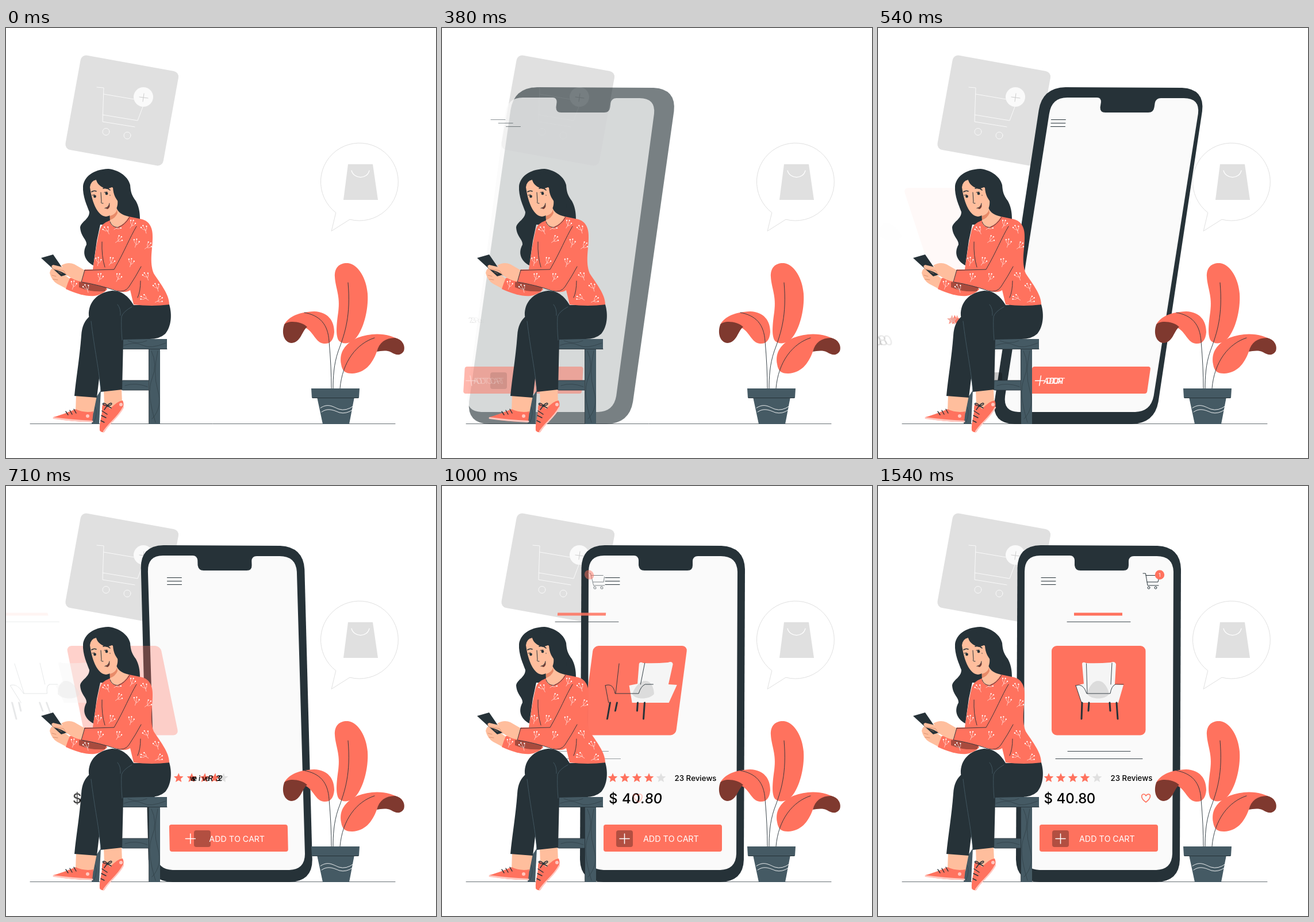
Animation, 748 px wide and 748 px high, one loop 1620 ms. Source, as an HTML page with a canvas:

```html
<!DOCTYPE html>
<html lang="en">
<head>
<meta charset="utf-8">
<title>Add to cart</title>
<style>
html, body { margin: 0; width: 100%; height: 100%; overflow: hidden; background: #fff; }
canvas { display: block; width: 100vw; height: 100vh; }
</style>
</head>
<body>
<canvas id="stage" width="748" height="748"></canvas>
<script>
const ctx = document.getElementById('stage').getContext('2d');
const DARK = '#263238', SLATE = '#455a64', CORAL = '#ff725e', MAROON = '#7f392f';
const SKIN = '#ffbe9d', GREY = '#e0e0e0', PALE = '#fafafa', WHITE = '#fff';
const LOOP = 1620, STEP = 1000 / 24, PHONE_Y = 396;

// ---------- drawing helpers ----------
const cache = {};
const path = d => cache[d] || (cache[d] = new Path2D(d));
function fill(d, color) { ctx.fillStyle = color; ctx.fill(path(d)); }
function line(d, color = DARK, width = 1) {
  ctx.strokeStyle = color;
  ctx.lineWidth = width;
  ctx.stroke(path(d));
}
function dot(x, y, r, color) {
  ctx.fillStyle = color;
  ctx.beginPath();
  ctx.arc(x, y, r, 0, 7);
  ctx.fill();
}
function ring(x, y, r, color, width = 1) {
  ctx.strokeStyle = color;
  ctx.lineWidth = width;
  ctx.beginPath();
  ctx.arc(x, y, r, 0, 7);
  ctx.stroke();
}
function box(x, y, w, h, r, color) {
  ctx.fillStyle = color;
  ctx.beginPath();
  ctx.roundRect(x, y, w, h, r);
  ctx.fill();
}
function star(x, y, color) {
  ctx.fillStyle = color;
  ctx.beginPath();
  for (let i = 0; i < 10; i++) {
    const r = i % 2 ? 3.9 : 8.8, a = i * Math.PI / 5;
    ctx.lineTo(x + r * Math.sin(a), y - r * Math.cos(a));
  }
  ctx.fill();
}

// ---------- motion ----------
function along(keys, u) {
  if (u <= keys[0][0]) return keys[0][1];
  for (let i = 1; i < keys.length; i++) {
    const [a, va] = keys[i - 1], [b, vb] = keys[i];
    if (u <= b) return va + (vb - va) * (u - a) / (b - a);
  }
  return keys[keys.length - 1][1];
}
// Each entrance slides in from the left, leans one way, swings back and settles.
const FAST = {
  x: [[0, -700], [6, -445], [9, -158], [11, 48], [12, 25], [13, 0]],
  lean: [[0, .364], [3, .35], [6, .24], [8.8, -.13], [11, -.21], [13, -.147], [14, -.08], [15.5, .02], [16.5, .036], [18, .02], [20, 0]],
  alpha: [[1, 0], [3, .03], [6, .17], [9, .62], [11, 1]]
};
const SLOW = {
  x: [[0, -370], [2, -352], [5, -270], [7, -190], [9, -140], [11, -60], [12, -25], [13, -2], [14, 5], [16, 0]],
  lean: [[0, .364], [4, .25], [7, .05], [9, -.08], [12, -.176], [14, -.1], [16, .035], [19, 0]],
  alpha: [[0, 0], [2, .07], [5, .35], [7, .65], [9, .85], [11, 1]]
};
const SQUARE = {
  x: [[4, -420], [9, -219], [13, -116], [17, 24], [20, 0]],
  lean: [[4, 0], [9, 0]],
  alpha: [[4, 0], [9, .35], [13, .75], [16, 1]]
};
let step = 0;
const rock = y => (y - PHONE_Y) * along(FAST.lean, step) / 2;

function enter(curve, pivot, draw, { delay = 0, rate = 1, reach = 1, shift = 0, fade = 1 } = {}) {
  const u = (step - delay) * rate;
  const alpha = along(curve.alpha, u) ** fade;
  if (!alpha) return;
  const lean = along(curve.lean, u);
  ctx.save();
  ctx.globalAlpha = alpha;
  ctx.transform(1, 0, lean, 1, along(curve.x, u) * reach + shift - lean * pivot, 0);
  draw();
  ctx.restore();
}
function letters(text, x, y, font, color, options, lag) {
  [...text].forEach((ch, i) => {
    ctx.font = font;
    const left = x + ctx.measureText(text.slice(0, i)).width;
    enter(SLOW, y - 5, () => {
      ctx.fillStyle = color;
      ctx.fillText(ch, left, y);
    }, { ...options, delay: options.delay + lag * i });
  });
}

// ---------- background ----------
function drawBackground() {
  ctx.fillStyle = WHITE;
  ctx.fillRect(0, 0, 748, 748);
  line('M42 688.5H677', DARK, .7);

  ctx.save();
  ctx.translate(201.7, 143.5);
  ctx.rotate(.179);
  box(-86.5, -83.5, 173, 167, 10, GREY);
  ctx.restore();
  line('M158 103L170 104L168 163L224 172M170 115L223 124M238 137L229 161L168 151', PALE);
  ring(174, 180.5, 6, PALE);
  ring(211, 187, 6, PALE);
  dot(239, 120, 17, PALE);
  line('M232 120L247 122M240 114L238 128', '#c8c8c8', .9);

  const bubble = 'M573.5 321A67.5 67.5 0 1 1 598 333L566.5 353Z';
  fill(bubble, WHITE);
  line(bubble, GREY);
  fill('M595 237H638L647 299H587Z', GREY);
  line('M601 248C605 263 628 264 632 248', WHITE, 1.2);
}

// ---------- phone and shop page ----------
function drawPhone() {
  enter(FAST, PHONE_Y, () => fill('M283 103L486 104Q526 106 527 145L525 650Q524 688 484 689H281Q241 688 240 650L242.5 143Q243 104 283 103Z', DARK));
  enter(FAST, PHONE_Y, () => fill('M282 121H334Q341 121 342 129V138Q343 147 352 147H427Q436 147 436 138V130Q437 122 445 122H485Q513 122 514 149L512 640Q511 667 484 668H281Q254 667 253.5 640L255 149Q255 121 282 121Z', PALE), { delay: .2, fade: .6 });

  [159.5, 165.5, 171.5].forEach((y, i) =>
    enter(FAST, y, () => line(`M284 ${y}H309`), { delay: 1.94 - .12 * i, rate: 1.19, shift: rock(y) }));

  const shift = rock(612);
  enter(FAST, 612, () => box(281, 589, 206, 47, 4, CORAL), { delay: 2.05, rate: 1.19, shift });
  enter(SQUARE, 613, () => box(303, 599, 29, 29, 4, 'rgba(0,0,0,.3)'));
  enter(SLOW, 613, () => line('M309 613.5H326M317.5 605V622', WHITE, 1.5), { delay: 5.8, rate: 1.7, shift });
  letters('ADD TO CART', 350, 618.5, '14.3px Inter, sans-serif', WHITE, { delay: 6.3, rate: 1.7, shift }, .09);

  for (let i = 0; i < 5; i++)
    enter(SLOW, 508, () => star(297 + 21 * i, 508, i < 4 ? CORAL : GREY),
      { delay: 8.45 + .35 * i, rate: 1.8, shift: rock(508) });
  letters('23 Reviews', 404.5, 512.5, '500 13.3px Inter, sans-serif', '#000', { delay: 7.3, rate: 1.2, shift: rock(508) }, .28);
  letters('$ 40.80', 288.5, 552, '500 24px Inter, sans-serif', '#000', { delay: 10, rate: 1.1 }, .2);
}

function drawProduct() {
  enter(SLOW, 355, () => box(302, 278, 163.5, 155.5, 9, CORAL), { delay: 11.5, rate: .85, reach: .65 });
  enter(SLOW, 345, () => fill('M355 309Q356 305 362 308Q383 309 405 307Q412 304 414 310L412 345L427 346L418 377H354L344 347L358 344Z', '#f5f5f5'), { delay: 11.7 });
  enter(SLOW, 355, () => fill('M364 362C367 347 375 339 383 339C393 339 400 351 402 362C395 372 371 372 364 362Z', '#dcdcdc'), { delay: 12.2 });
  enter(SLOW, 345, () => line('M362.5 309L364 361M407 308L405 345M344 347Q357 342 363 361H404Q406 348 413 345H427M344 347L354 377', DARK, .9), { delay: 14.9, rate: 1.21 });
  enter(SLOW, 390, () => {
    line('M355 377L354 405M415 377L417 405', DARK, 3);
    line('M367 377L366 391M403 377L404 391', DARK, 3);
  }, { delay: 15, rate: 1.21 });

  enter(SLOW, 223, () => box(341, 220.5, 84, 5, 0, CORAL), { delay: 15 });
  enter(SLOW, 236, () => line('M329 236.3H439', DARK, .9), { delay: 14.8 });
  enter(SLOW, 461, () => line('M330 461.5H439', DARK, .9), { delay: 18, reach: .65 });
  enter(SLOW, 474, () => line('M309 474.5H460', DARK, .9), { delay: 18, reach: .65 });
  enter(SLOW, 543, () => line('M466 550C456 543 458 536 462 536Q465 536 466 539Q468 536 471 536C475 537 475 543 466 550Z', CORAL, 1.6), { delay: 18.5, reach: .5 });

  enter(SLOW, 165, () => {
    line('M461 152H465.5L469 173H488M466 155.5H487M468 167H487L489 158', DARK, 1);
    ring(471, 177, 2, DARK);
    ring(483, 177, 2, DARK);
  }, { delay: 17.4 });
  enter(SLOW, 154, () => {
    dot(490, 154.5, 8.2, CORAL);
    ctx.fillStyle = WHITE;
    ctx.font = '9px Inter, sans-serif';
    ctx.fillText('1', 488, 158);
  }, { delay: 18.1 });
}

// ---------- foreground ----------
function drawPlant() {
  fill('M572 433C571 415 582 408 595 409C614 412 627 437 629 462C631 492 621 525 609 539C600 550 586 551 579 544C573 535 575 515 578 494C582 466 573 452 572 433Z', CORAL);
  fill('M484 516C492 501 511 494 536 493C560 494 571 509 571 529C570 544 563 550 553 549C539 548 535 529 522 522C509 518 496 516 484 516Z', CORAL);
  fill('M484 516C490 508 514 510 524 520C515 526 513 547 497 548C483 547 479 530 484 516Z', MAROON);
  fill('M583 585C579 564 590 549 611 539C637 529 667 530 690 546C667 535 652 543 645 563C637 585 624 600 602 601C590 601 585 597 583 585Z', CORAL);
  fill('M645 563C649 547 660 539 677 539C690 542 695 553 692 562C686 571 678 569 670 564C662 560 652 562 645 563Z', MAROON);
  line('M595 443C600 500 590 530 578 562C570 585 569 608 569 627M519 495C546 500 560 515 562 545Q566 590 566 627M641 539C610 549 585 580 581 627', DARK, .9);
  fill('M541 642H606L597 689H551Z', SLATE);
  fill('M531 627H615L614 643H532Z', SLATE);
  line('M533 643.5H613', DARK, 1.2);
  line('M547 661C560 652 569 659 579 663Q592 667 605 657M549 668C560 660 570 665 580 669Q592 672 603 664', WHITE, .9);
}

function drawStool() {
  fill('M131 541H280V559H131Z', SLATE);
  fill('M248 559H268V689H249Z', SLATE);
  fill('M200 613H248V630H200Z', SLATE);
  fill('M152 650L165 630L162 689H149Z', SLATE);
  line('M202 558.5H280M203 613H248M248.5 559V688M203 630H248', DARK, .8);
  line('M205 552Q225 545 238 552T278 548M212 544Q229 551 245 544M207 622Q225 616 246 624M253 562Q264 585 254 610T260 686M264 562Q255 600 264 630T254 680M155 660Q160 670 153 686', DARK, .5);
}

function drawLegs() {
  fill('M122 638L158 640L152 670L121 667Z', SKIN);
  fill('M170 628L201 627L202 652L181 665L171 657Z', SKIN);
  fill('M82 677C100 672 111 667 121 663Q136 670 152 667L150 685Q113 685 83 679Z', CORAL);
  line('M83 678.5Q115 683 150 684.5', '#ffc7bf', 3);
  dot(142, 675, 3, '#ffc7bf');
  line('M104 667L108 673M111 665L115 672M118 663L122 670', DARK, 1.4);
  fill('M167 660Q168 652 173 654L181 663Q193 649 203 648Q206 655 203 662C192 680 182 685 171 703Q166 704 163 700C162 684 168 674 167 660Z', CORAL);
  line('M204 660C194 679 180 686 170 702', '#ffc7bf', 2.5);
  dot(200, 655, 3, '#ffc7bf');
  line('M167 666L176 672M166 674L174 678M165 683L171 686', DARK, 1.4);
  line('M176 656C168 648 164 657 176 657C185 647 188 657 176 657L171 664M176 657L183 661', DARK, 1.5);

  fill('M148 500C137 507 132 519 131 535C128 575 122 608 119 640L158 643L168 560Z', DARK);
  fill('M144 500C143 476 160 460 184 457Q207 456 222 482L284 481C289 498 288 519 277 532Q266 542 246 541L204 542L202 629L165 633C162 593 151 548 144 500Z', DARK);
  line('M148 510C154 560 162 595 165 632M219 485Q204 493 201 502Q200 520 202 543M194 481Q200 488 199 500', SLATE, .9);
}

function sprig(x, y, turn) {
  ctx.save();
  ctx.translate(x, y);
  ctx.rotate(turn);
  ctx.scale(.85, .85);
  line('M0 9Q2 0 0 -7M1 4Q5 2 6 -3M1 2Q-4 0 -5 -5', WHITE, .6);
  for (const [dx, dy] of [[0, -8], [6, -4], [-5, -6]]) dot(dx, dy, 1.4, WHITE);
  ctx.restore();
}

function drawBody() {
  // hair behind the shoulders
  fill('M178 245C192 246 212 256 216 273C217 285 218 290 226 301C231 310 233 320 233 333L198 344L164 342L158 370L152 413C137 405 132 391 140 377C141 368 130 363 129 347C130 337 145 333 145 320C141 309 133 293 134 275C136 259 151 246 178 245Z', DARK);
  // far arm
  fill('M76 426Q77 418 84 417L100 428L112 437L106 454L89 445Q79 439 76 426Z', SKIN);
  line('M80 430L87 432M82 437L90 438', '#c9805f', .7);
  fill('M111 435Q107 444 104 454Q135 468 154 466Q167 464 176 455L164 430Z', CORAL);
  fill('M127 442L178 445L172 458Q148 460 127 451Z', '#a84b3e');
  // device and near hand
  fill('M61 400L82 394L106 429L96 432Z', DARK);
  fill('M96 413Q108 406 119 411L138 422L132 441Q119 440 106 430Q98 423 83 420Q76 414 82 412L99 416Z', SKIN);
  line('M83 419L100 422L106 431M91 424L97 427', '#c9805f', .7);
  // sweater
  fill('M180 335Q166 340 163 351C157 375 154 401 151 420L137 420L131 442Q165 448 193 457Q207 462 216 456L222 481Q254 485 284 481C284 463 268 444 257 427C249 407 255 385 255 365C256 346 248 334 233 332L214 328Z', CORAL);
  line('M227 345C215 365 206 389 188 420L137 421.5M132 442Q163 447 191 457Q207 461 214 450Q226 432 235 415M167 372Q166 397 172 416M137 421L131 442M234 440Q234 458 229 469', DARK, .9);
  [[175, 352, -.6], [219, 341, .4], [194, 346, .9], [241, 350, -.4], [226, 374, .2], [196, 368, .8],
   [160, 406, .1], [183, 406, .5], [217, 408, .2], [247, 379, .8], [163, 434, .3], [195, 434, .4],
   [244, 432, -.5], [241, 470, -1.1], [262, 451, -.4], [266, 473, 1], [117, 447, .2], [140, 453, -.4]]
    .forEach(s => sprig(...s));
}

function drawHead() {
  fill('M180 315L191 308Q193 324 214 328Q206 342 194 346Q183 347 181 337Z', SKIN);
  line('M181 337Q184 346 194 347Q207 343 215 329', DARK, .9);
  fill('M181 327Q191 324 193 316L194 322Q190 331 181 334Z', '#e88a68');
  fill('M146 277Q147 266 157 264Q160 276 176 280L187 276Q187 291 194 299C196 313 188 326 174 328C160 327 150 306 146 277Z', SKIN);
  fill('M157 264Q161 277 172 275Q180 273 186 278C187 291 191 296 195 302C194 315 205 324 214 328L219 291L205 260L177 250Z', DARK);
  line('M149 285Q153 282 157 284M169 279Q175 277 181 282', DARK, 1.6);
  dot(154.5, 293, 2.4, DARK);
  dot(175, 288, 2.4, DARK);
  line('M150 291L154 290M171 286L176 285', DARK, 1);
  line('M165 286L166 302Q164 305 169 305', DARK, 1);
  fill('M173 314Q179 311 180 306Q182 311 177 315Z', '#713a32');
  line('M172 313.5Q179 312 180 305', DARK, 1);
  dot(181, 291, .7, DARK);
}

function render(now) {
  step = Math.floor((now % LOOP + 4.9) / STEP);
  drawBackground();
  if (step > 1) {
    drawPhone();
    drawProduct();
  }
  drawPlant();
  drawStool();
  drawLegs();
  drawBody();
  drawHead();
  requestAnimationFrame(tick);
}
function tick() { render(performance.now()); }
ctx.lineCap = 'round';
ctx.lineJoin = 'round';
tick();
</script>
</body>
</html>
```
